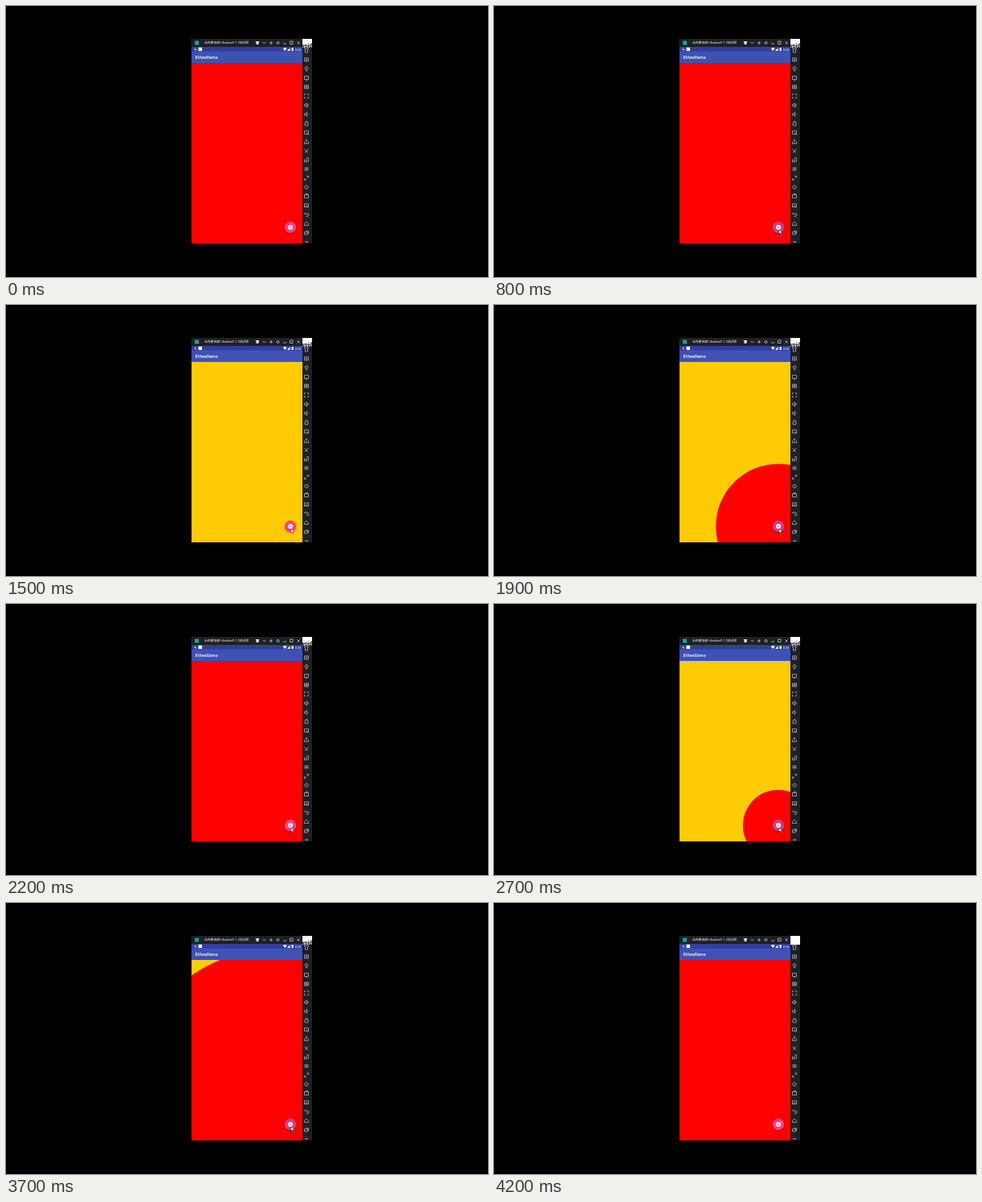
These frames come from a looping animation (600 px wide and 338 px high, 5100 ms). An HTML page:

```html
<!DOCTYPE html>
<html lang="zh">
<head>
<meta charset="utf-8">
<style>
  html, body { margin: 0; width: 100%; height: 100%; overflow: hidden; background: #000; }
  svg { display: block; width: 600px; height: 338px; }
  text { font-family: Roboto, "Noto Sans CJK SC", "Noto Sans CJK", sans-serif; fill: #fff; }
  .line { fill: none; stroke: #c4c6ca; stroke-width: .7; }
</style>
</head>
<body>
<svg viewBox="0 0 600 338">
  <defs>
    <clipPath id="screen"><rect x="231" y="71" width="138" height="225"/></clipPath>
    <clipPath id="corner"><rect x="369" y="41" width="12" height="11"/></clipPath>
    <filter id="soft" x="-50%" y="-50%" width="200%" height="200%"><feGaussianBlur stdDeviation="1"/></filter>
  </defs>
  <rect width="600" height="338"/>

  <!-- window frame and title bar -->
  <rect x="230.5" y="41" width="150.5" height="255" fill="#1d2025"/>
  <rect x="235" y="43.5" width="5" height="5" fill="#12a79d"/>
  <text x="247" y="47.3" font-size="3.8">岚舟模拟器1-Android7.1.2测试版</text>
  <path fill="#dcdde0" d="M310.5 44h5l-1 2v2h-3v-2z"/>
  <g class="line" style="stroke:#dcdde0">
    <path d="M319.5 45l2 2 2-2M328 46h4M330 44v4M345 47h4M353.500 44h3.500v3.500h-3.500zM362.500 44.500l3 3m0-3l-3 3"/>
    <circle cx="338.500" cy="46" r="1.500"/>
  </g>
  <g clip-path="url(#corner)">
    <rect x="369" y="41" width="12" height="11" fill="#fff"/>
    <text id="label" x="368.500" y="51.500" font-size="6.500" font-weight="700" style="fill:#111">void</text>
  </g>
  <g id="sidebar" class="line"></g>

  <!-- app bars -->
  <rect x="231" y="51" width="138" height="6" fill="#303f9f"/>
  <rect x="231" y="56.500" width="138" height="14.500" fill="#3f51b5"/>
  <path d="M234 52.500l3 1.500-1 2z" fill="#cfd4ee"/>
  <rect x="239.500" y="51.800" width="4.500" height="4.200" rx=".6" fill="#fff"/>
  <path d="M344.800 53q2.400-2 4.800 0l-2.400 3zM350 56l3.500-3.800v3.800zM355.500 52.300h2.200v3.700h-2.200z" fill="#fff"/>
  <text x="360" y="55.600" font-size="3.800">8:28</text>
  <text x="235.300" y="66" font-size="5.200" font-weight="500">XViewDemo</text>

  <!-- revealed content -->
  <g clip-path="url(#screen)">
    <rect x="231" y="71" width="138" height="225" fill="#ffcb05"/>
    <circle id="reveal" cx="354" cy="276" r="260" fill="#f00"/>
    <circle id="shadow" cx="354" cy="277.200" r="7" opacity=".3" filter="url(#soft)"/>
    <circle cx="354" cy="276" r="7.200" fill="#ff4081"/>
    <circle id="ripple" cx="354" cy="276" r="7.200" fill="#8a3f86"/>
    <circle cx="354" cy="276" r="3" fill="#f4f2ee"/>
    <path d="M352.300 277.300a1.700 1.700 0 0 1 3.400 0z" fill="#8aa08a"/>
  </g>
  <path id="cursor" d="M0 0v5.200l1.300-1.100.9 2 .9-.4-.9-1.900h1.600z" fill="#fff" stroke="#111" stroke-width=".4"/>
</svg>
<script>
const LOOP = 5100, STEP = 100, FULL = 239;
const get = id => document.getElementById(id);
const clamp = x => Math.max(0, Math.min(1, x));
const ease = x => (1 - Math.cos(Math.PI * clamp(x))) / 2;

const box = 'M-2.5-2h5v4h-5z';
const speaker = 'M-2.5-1h1l2-1.500v5l-2-1.500h-1z';
const icons = [
  'M-2.5-2.500h5l-1 2v3h-3v-3z', box + 'M-1 1h2M-1-.5h2', 'M0 3l-2-4 2-2 2 2zM-.5-1h1',
  box + 'M-1 3h2', box + 'M-1-1h2v2h-2z',
  'M-2.5-1v-1.500h1.500m2 0h1.500v1.500m0 2v1.500h-1.500m-2 0h-1.500v-1.500',
  speaker + 'M2-1.500v3', speaker + 'M2-.5v1',
  'M-2 2.500v-3h1v-2h2v1h1v4z', box + 'M0 0l2.500 2.500',
  'M-2.500 0v2.500h5v-2.500M0 1v-3.500l-1.500 1.500m1.500-1.500l1.500 1.500',
  'M-2.500-2l4 4m1-4l-4 4M-2 2h1M1 2h1', 'M-2.500 0h3v2.500h-3zM0-2.500h2.500v5',
  'M-2.500-1.500h5M-2.500 0h5M-2.500 1.500h5', 'M.5-2.500h2v2M-.5 2.500h-2v-2M2-2l-1.500 1.500M-2 2l1.500-1.500',
  'M-1-2h2l1 1v2l-1 1h-2l-1-1v-2z', box + 'M-1-2v-1h3', box + 'M-2 2l2-2 2 2',
  'M-1-2.500l-1.500 1.500h5v3h-3', 'M-2.500 0l2.500-2.500 2.500 2.500v2h-5z', 'M-2.500-1h4v3h-4zM-1-2h3.500v3',
  'M0-1l-1.500 1 1.500 1m2-2l-1.500 1 1.500 1'
];
get('sidebar').innerHTML = icons.map((d, i) =>
  `<path d="${d}" transform="translate(374 ${55.500 + i * 11.370})"/>`).join('');

// Each tap toggles the circle: hide, show, hide, show.
const taps = [
  { start: 790, length: 465, show: false },
  { start: 1784, length: 300, show: true },
  { start: 2485, length: 300, show: false },
  { start: 3450, length: 300, show: true }
];

function draw(t) {
  const tap = taps.filter(p => p.start <= t).pop();
  let radius = 260, pressed = 0;
  if (tap) {
    const x = (t - tap.start) / tap.length, k = ease(x);
    radius = tap.show ? (x >= 1 ? 260 : FULL * k) : FULL * (1 - k);
    pressed = clamp((tap.start + tap.length + 80 - t) / 150);
  }
  get('reveal').setAttribute('r', radius);
  get('ripple').setAttribute('opacity', pressed * .45);
  get('label').setAttribute('opacity', t < 4200 ? 1 : 0);

  const away = 1 - ease((t - 200) / 500) + ease((t - 3800) / 400);
  const cursor = get('cursor');
  cursor.setAttribute('transform', `translate(${355 + away * 14} ${279 - away * 232})`);
  cursor.setAttribute('visibility', t >= 300 && t < 4200 ? 'visible' : 'hidden');
}

function tick() {
  const t = performance.now() % LOOP;
  draw(Math.floor(t / STEP) * STEP);
  requestAnimationFrame(tick);
}
tick();
</script>
</body>
</html>
```
